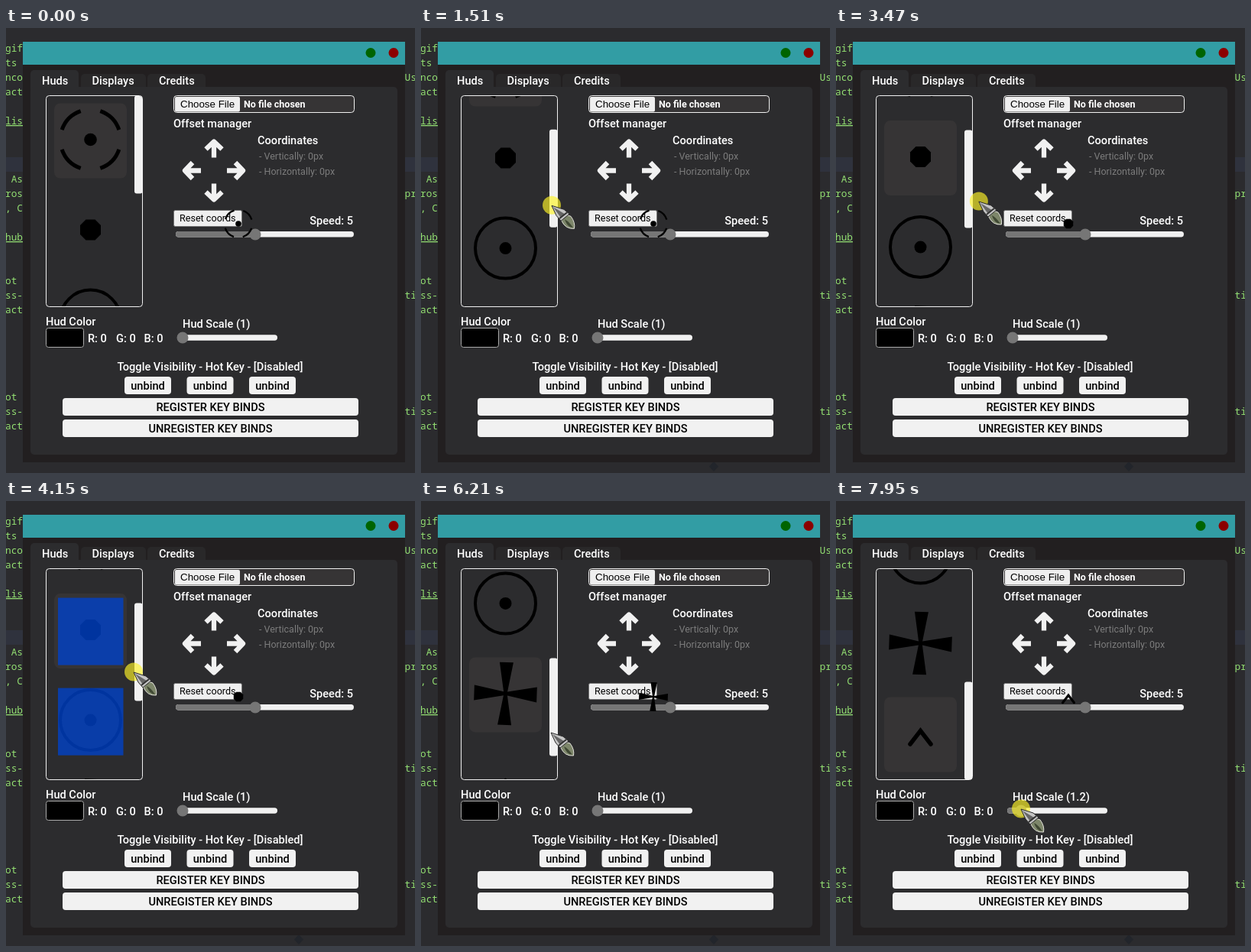
An HTML page that plays this animation: 535 px wide and 582 px high, repeating every 8000 ms.

```html
<!DOCTYPE html>
<html lang="en">
<head>
<meta charset="utf-8">
<title>Hud panel</title>
<style>
html, body { margin: 0; width: 100%; height: 100%; overflow: hidden; background: #2b2b2e; }
svg { display: block; width: 535px; height: 582px; }
text { font: 500 14.6px Roboto, sans-serif; fill: #fff; white-space: pre; }
#editor text { font: 12.8px "Noto Sans Mono", monospace; fill: #93df72; }
#editor .link { text-decoration: underline; }
.head, #buttons text { text-anchor: middle; }
#buttons text { fill: #000; }
.dim { font-size: 12.5px; font-weight: 400; fill: #7c7c7c; }
.file { font-size: 12.5px; font-weight: 700; }
.native { font: 13.33px "Liberation Sans", Arial, sans-serif; fill: #000; }
.reset { font-size: 12.6px; font-weight: 400; fill: #000; }
.light, #buttons rect { fill: #f1f1f1; }
.grey { fill: #767676; }
.outline { fill: none; stroke: #f1f1f1; }
.arrow { fill: none; stroke: #f1f1f1; stroke-width: 6.3; stroke-linejoin: round; }
</style>
</head>
<body>
<svg viewBox="0 0 535 582">
  <defs>
    <clipPath id="listClip"><rect x="53" y="89" width="125.5" height="275.5" rx="4"/></clipPath>
    <g id="icon0">
      <circle r="39.5" fill="none" stroke="#000" stroke-width="5" pathLength="360" stroke-dasharray="52 38" stroke-dashoffset="-19"/>
      <circle r="8.3"/>
    </g>
    <path id="icon1" d="M-6-13.5H6L13.5-6V6L6 13.5H-6L-13.5 6V-6Z"/>
    <g id="icon2"><circle r="39.5" fill="none" stroke="#000" stroke-width="4"/><circle r="8"/></g>
    <path id="icon3" transform="rotate(2)" d="M-9-41H9L2.5-2.5L41-10V10L2.5 2.5L9 41H-9L-2.5 2.5L-41 10V-10L-2.5-2.5Z"/>
    <path id="icon4" d="M-13.5 14L0-3.5L13.5 14" fill="none" stroke="#000" stroke-width="5.5" stroke-linecap="round"/>
    <path id="arrow" class="arrow" d="M-10.5 1L0-9L10.5 1M0-9V12"/>
  </defs>

  <rect y="169" width="535" height="19" fill="#2f323d"/>
  <g id="editor"></g>
  <path id="mark" d="M383 567l6 6.5l-6 6.5l-6-6.5z" fill="#22252b"/>

  <rect x="22" y="18" width="500" height="550" fill="#221f20"/>
  <rect x="22" y="18" width="500" height="30" fill="#329da4"/>
  <circle cx="477" cy="32.5" r="6.5" fill="#006400"/>
  <circle cx="507" cy="32.5" r="6.5" fill="#8b0000"/>
  <g fill="#292829">
    <rect x="98" y="60" width="85" height="22" rx="5"/>
    <rect x="185" y="60" width="76" height="22" rx="5"/>
  </g>
  <g fill="#2c2c2e">
    <rect x="32" y="55" width="63" height="30" rx="5"/>
    <rect x="32" y="77" width="480" height="481" rx="5"/>
  </g>
  <text x="47" y="74">Huds</text>
  <text x="112.5" y="74">Displays</text>
  <text x="200" y="74">Credits</text>

  <g clip-path="url(#listClip)">
    <g id="items"></g>
    <rect id="bar" class="light" x="168" width="10.5" height="128" rx="3"/>
  </g>
  <rect class="outline" x="52.5" y="88.5" width="126" height="276" rx="4"/>

  <rect x="219.5" y="88.5" width="236" height="22" rx="4" fill="#363435" stroke="#f1f1f1"/>
  <rect x="221" y="90" width="85" height="19.5" rx="2" fill="#efefef"/>
  <text x="228" y="104" class="native">Choose File</text>
  <text x="311" y="104" class="file">No file chosen</text>

  <text x="219" y="130">Offset manager</text>
  <g id="arrows"></g>
  <text x="329" y="152">Coordinates</text>
  <text x="331" y="172" class="dim">- Vertically: 0px</text>
  <text x="331" y="192" class="dim">- Horizontally: 0px</text>
  <rect x="219.5" y="238.5" width="89" height="21" rx="2" fill="#efefef" stroke="#767676"/>
  <text x="227" y="253" class="reset">Reset coords</text>

  <text x="454" y="257" text-anchor="end">Speed: 5</text>
  <rect class="light" x="222" y="266" width="233" height="7.5" rx="3.7"/>
  <rect class="grey" x="222" y="266" width="104" height="7.5" rx="3.7"/>
  <circle class="grey" cx="326" cy="270" r="7.5"/>

  <text x="52" y="389">Hud Color</text>
  <rect x="52.5" y="392.5" width="49" height="25" rx="3" stroke="#aaa"/>
  <text x="107" y="411">R: 0</text>
  <text x="144" y="411">G: 0</text>
  <text x="180.5" y="411">B: 0</text>
  <text x="231" y="392" id="scaleLabel"></text>
  <rect class="light" x="224" y="401.3" width="131" height="7.5" rx="3.7"/>
  <rect class="grey" id="fill" x="224" y="401.3" height="7.5" rx="3.7"/>
  <circle class="grey" id="knob" cy="405" r="7.5"/>

  <text x="267" y="448" class="head">Toggle Visibility - Hot Key - [Disabled]</text>
  <g id="buttons"></g>
  <use id="preview"/>

  <g id="cursor">
    <circle id="press" cy="-.5" r="12" fill="#fff528" fill-opacity=".66"/>
    <path d="M13 20Q17 10 25 14Q31 22 29.500 30Q18 31 13 20Z" fill="#7d866a" stroke="#e2e2da"/>
    <path d="M17 18Q23 21 28 29Q20 28 17 18Z" fill="#3f4833"/>
    <path d="M0 0L16 5L23 11L12 20L6 13Z" fill="#c4c4c4" stroke="#292929"/>
    <path d="M2 2L17 11L12 16Z" fill="#666"/>
    <path d="M10 17L20 9" stroke="#333" stroke-width="2"/>
  </g>
</svg>

<script>
const $ = id => document.getElementById(id);

function add(parent, tag, attrs, content = '') {
  const el = document.createElementNS('http://www.w3.org/2000/svg', tag);
  for (const name in attrs) el.setAttribute(name, attrs[name]);
  el.textContent = content;
  return parent.appendChild(el);
}
const set = (id, name, value) => $(id).setAttribute(name, value);
const show = (el, visible) => el.style.display = visible ? '' : 'none';

// Editor lines peeking out on both sides of the window
'gif/ts/nco|Us/act//lis//// As/ros|pr/, C//hub///ot/ss-|ti/act//////ot/ss-|ti/act'
  .split('/').forEach((line, row) => {
    const [left, right = ''] = line.split('|'), y = 31 + row * 19;
    add($('editor'), 'text', { x: -1, y, class: /lis|hub/.test(left) ? 'link' : '' }, left);
    add($('editor'), 'text', { x: 521.5, y }, right);
  });

for (let turn = 0; turn < 360; turn += 90) {
  add($('arrows'), 'use', { href: '#arrow', transform: `translate(272 186.5) rotate(${turn}) translate(0 -29)` });
}

function button(x, y, width, content) {
  add($('buttons'), 'rect', { x, y, width, height: 23, rx: 4 });
  add($('buttons'), 'text', { x: x + width / 2, y: y + 17 }, content);
}
for (let i = 0; i < 3; i++) button(155 + i * 81.5, 456, 61, 'unbind');
button(74, 484, 387, 'REGISTER KEY BINDS');
button(74, 512, 387, 'UNREGISTER KEY BINDS');

const LIST_TOP = 88, PITCH = 118, MAX_SCROLL = 314, SCROLL_RATIO = 2.12, KNOB_X = 231;

const items = [0, 1, 2, 3, 4].map(i => {
  const group = add($('items'), 'g', { transform: `translate(110.5 ${146 + i * PITCH})` });
  const card = add(group, 'rect', { x: -47.5, y: -47.5, width: 95, height: 98, rx: 8, fill: '#363435' });
  add(group, 'use', { href: '#icon' + i });
  const tint = add(group, 'rect', { x: -42.5, y: -42, width: 85.5, height: 88, fill: '#0041c7', 'fill-opacity': .8 });
  return { card, tint };
});

// Cursor glides: start time, end time, x, y; it rests in between
const glides = [
  [0, 0, 359, 549],
  [260, 850, 120, 215], [850, 1020, 171, 188], [1090, 1540, 171, 233],
  [1930, 2150, 135, 258], [2150, 2380, 105, 176], [2470, 2754, 161, 226],
  [2754, 2910, 200, 229], [3110, 3890, 167, 224], [4150, 4900, 170, 296],
  [4900, 4970, 169, 290], [4990, 5370, 105, 255], [5480, 5730, 170, 303],
  [6240, 6560, 173, 351], [6630, 6850, 110, 318], [7250, 7600, KNOB_X, 403],
  [7780, 7950, KNOB_X + 11, 403]
];
const barDrags = [[1055, 1860], [4130, 4900], [6240, 6560]];
const clicks = [2400, 5390, 6870];
const selecting = [3300, 3820], sliding = [7650, 8000];

const clamp = (v, low, high) => Math.min(high, Math.max(low, v));
const within = (t, [from, to]) => t >= from && t < to;

function cursorAt(t) {
  let x = 0, y = 0;
  for (const [from, to, toX, toY] of glides) {
    if (t < from) break;
    const p = clamp((t - from) / (to - from || 1), to > from ? 0 : 1, 1);
    const eased = p * p * (3 - 2 * p);
    x += (toX - x) * eased;
    y += (toY - y) * eased;
  }
  return { x, y };
}

function scrollAt(t) {
  let pulled = 0;
  for (const [from, to] of barDrags) {
    if (t > from) pulled += cursorAt(Math.min(t, to)).y - cursorAt(from).y;
  }
  return Math.min(MAX_SCROLL, pulled * SCROLL_RATIO);
}

// Each click picks the item under the cursor
const picks = clicks.map(t => Math.floor((cursorAt(t).y + scrollAt(t) - LIST_TOP) / PITCH));

function draw(time) {
  const step = 69.28;
  const t = time < 260 ? 0 : 260 + Math.floor((time - 260) / step + .2) * step;
  const { x, y } = cursorAt(t);
  const scroll = scrollAt(t);
  const chosen = picks[clicks.filter(click => click <= t).length - 1] ?? 0;
  const knobX = within(t, sliding) ? Math.max(KNOB_X, x) : KNOB_X;
  const scale = 1 + Math.round((knobX - KNOB_X) / 5.5) / 10;
  const pressed = barDrags.some(([from, to]) => within(t, [from, to + 90]))
    || clicks.some(click => within(t, [click, click + 80]))
    || within(t, selecting) || within(t, sliding);

  show($('cursor'), t >= 260);
  show($('mark'), t >= 260);
  show($('press'), pressed);
  set('cursor', 'transform', `translate(${x} ${y})`);
  set('items', 'transform', `translate(0 ${-scroll})`);
  set('bar', 'y', LIST_TOP + .5 + scroll / SCROLL_RATIO);
  items.forEach(({ card, tint }, i) => {
    show(card, i === chosen);
    show(tint, (i === 1 || i === 2) && within(t, [3460, 4190]));
  });
  set('preview', 'href', '#icon' + chosen);
  set('preview', 'transform', `translate(304 256) scale(${.46 * scale})`);
  set('knob', 'cx', knobX);
  set('fill', 'width', knobX - 224);
  $('scaleLabel').textContent = `Hud Scale (${+scale.toFixed(1)})`;
}

function loop() {
  draw(performance.now() % 8000);
  requestAnimationFrame(loop);
}
loop();
</script>
</body>
</html>
```
